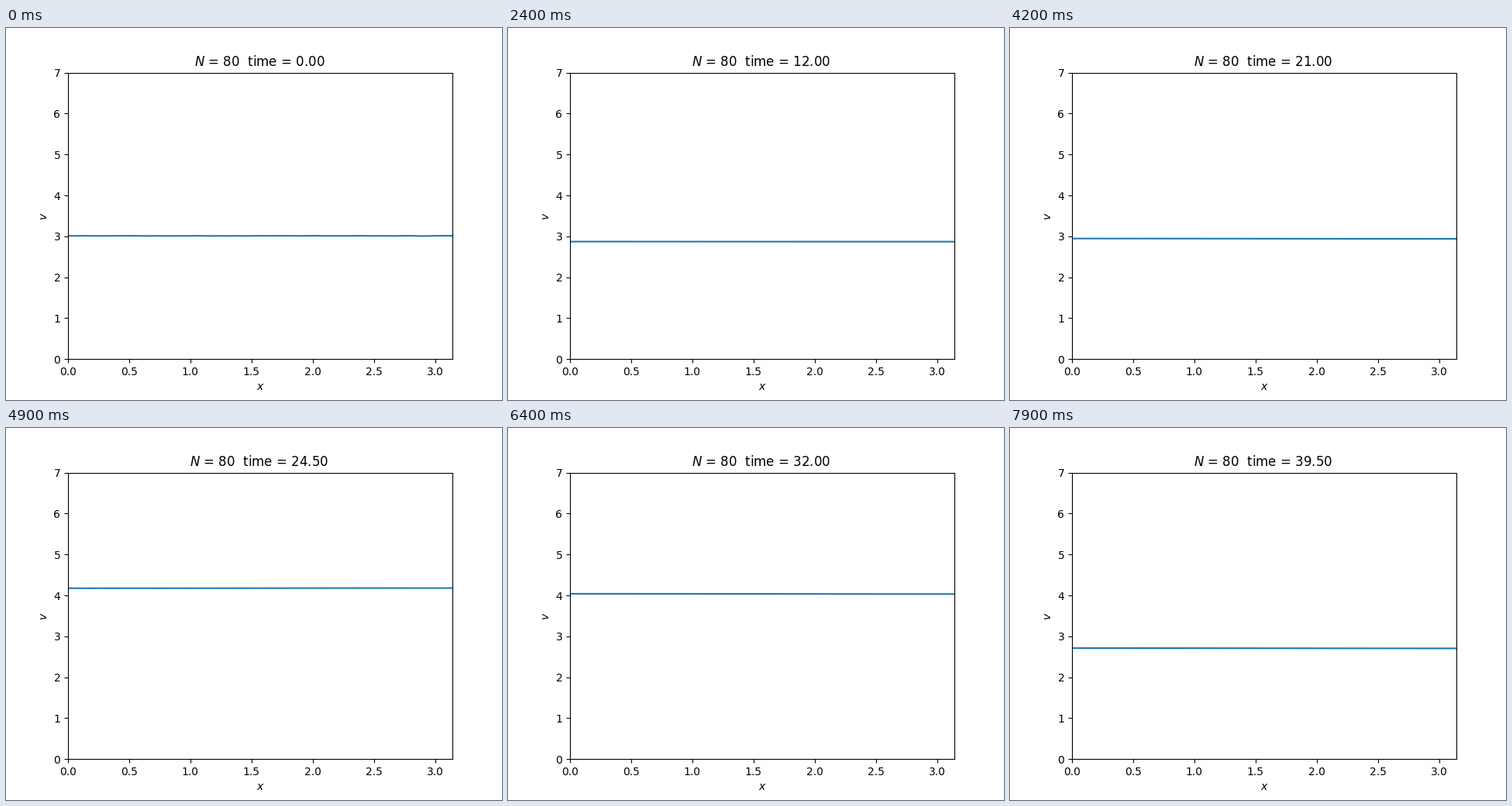
A matplotlib script that plays this animation: 640x480 px, repeating every 8000 ms.

```python
import numpy as np
import matplotlib.pyplot as plt
from matplotlib.animation import FuncAnimation

N = 80
FRAMES = 80
DT = 0.5
STEADY = 3.0
LIMIT = 1.65   # squared amplitude of the limit cycle
GROWTH = 0.4   # growth rate of the squared amplitude
OMEGA = 0.78   # frequency of small swings
SLOWING = 0.072  # loss of frequency per squared amplitude
LAG = 0.006    # the left end runs slightly ahead of the right

x = np.linspace(0, np.pi, N + 1)
modes = np.arange(1, N // 2)
weights = np.random.default_rng(4).normal(0, 0.0003, modes.size)


def deviation(t):
    """Oscillation that grows, saturates and slows down near a limit cycle."""
    free = 0.041 * np.exp(GROWTH * (t - 10.7))
    power = free / (1 + free / LIMIT)
    delay = SLOWING * LIMIT / GROWTH * np.log1p(free / LIMIT)
    phase = OMEGA * t - 8.33 - delay
    phase = phase - 0.103 * power * (1 - np.cos(phase - 0.26))
    return 0.09 * power - np.sqrt(power) * np.cos(phase)


def noise(t):
    """Initial roughness, smoothed by diffusion."""
    return (weights * np.exp(-0.3 * modes ** 2 * t)) @ np.cos(np.outer(modes, x))


def profile(t):
    return STEADY + deviation(t + LAG * np.cos(x)) + noise(t)


fig, ax = plt.subplots(figsize=(6.4, 4.8), dpi=100)
line, = ax.plot(x, profile(0))
ax.set_xlim(0, np.pi)
ax.set_ylim(0, 7)
ax.set_xlabel("$x$")
ax.set_ylabel("$v$")
title = ax.set_title("", x=0.498)


def update(i):
    t = i * DT
    line.set_ydata(profile(t))
    title.set_text(f"$N$ = {N}  time = {t:.2f}")
    return line, title


anim = FuncAnimation(fig, update, frames=FRAMES, interval=1000 * 8 / FRAMES,
                     repeat=True, repeat_delay=0, blit=False)
plt.show()
```
